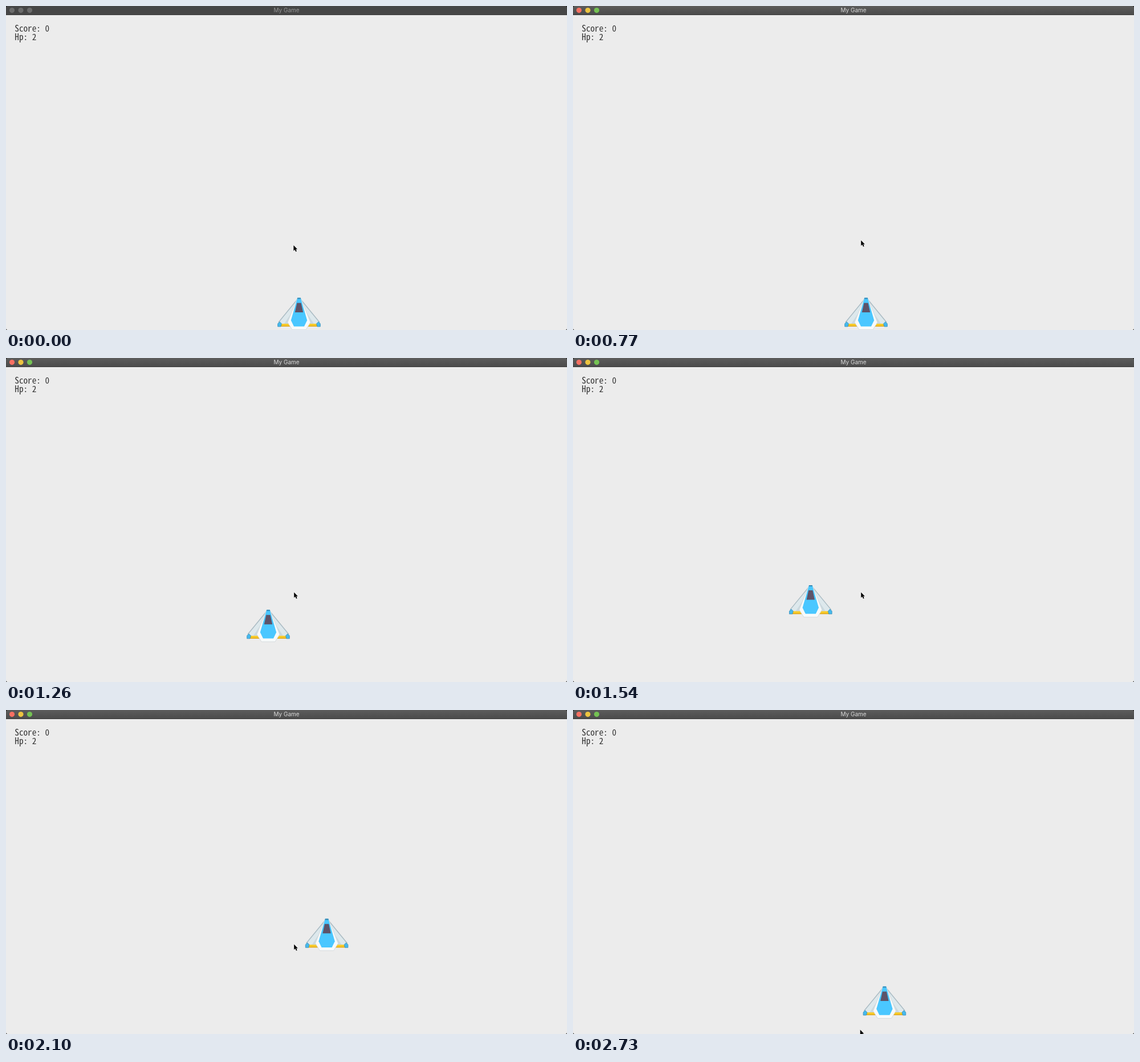
These frames come from a looping animation (984x569 px, 2800 ms). An HTML page:

```html
<!DOCTYPE html>
<html lang="en">
<head>
<meta charset="utf-8">
<title>My Game</title>
<style>
  html, body { margin: 0; width: 100%; height: 100%; overflow: hidden; background: #ececec; }
  svg { display: block; width: 984px; height: 569px; }
  .title { font: 10px Inter, Roboto, sans-serif; text-anchor: middle; }
  .hud { font: 15.2px "Noto Sans Mono CJK JP", "Noto Sans CJK JP", "Noto Sans Mono", monospace; fill: #333; white-space: pre; }
</style>
</head>
<body>
<svg viewBox="0 0 984 569">
  <defs>
    <linearGradient id="bar" x1="0" y1="0" x2="0" y2="1">
      <stop offset="0" stop-color="#5c5c5c"/>
      <stop offset="1" stop-color="#4b4b4b"/>
    </linearGradient>
    <g id="wing">
      <path d="M-2.5 3L-37 44.5V49H-14L-3 20Z" fill="#dde8ec"/>
      <path d="M-5 14L-26 46H-17Z" fill="#cbd9df"/>
      <path d="M-2.8 3L-36 43.5" fill="none" stroke="#a9bac2" stroke-width="1.4"/>
      <path d="M-33 46H-15V51H-33Z" fill="#f8ca28"/>
      <path d="M-33 49.6H-15V51H-33Z" fill="#dca51e"/>
      <path d="M-34 42.5L-37.3 46V51H-32L-30.6 46Z" fill="#45b9ee" stroke="#3b8fb5" stroke-width=".8"/>
    </g>
  </defs>

  <rect width="984" height="569" fill="#ececec"/>
  <rect id="top" width="984" height="15.5"/>
  <rect y="15" width="984" height="1" fill="#3a3a3a"/>
  <path d="M0 0H3Q0 0 0 3ZM984 0H981Q984 0 984 3ZM0 569V566Q0 569 3 569ZM984 569V566Q984 569 981 569Z" fill="#111"/>
  <g id="lights">
    <circle cx="10.5" cy="7.6" r="4.6"/>
    <circle cx="26" cy="7.6" r="4.6"/>
    <circle cx="41.5" cy="7.6" r="4.6"/>
  </g>
  <text id="title" class="title" x="492" y="11.4">My Game</text>
  <text class="hud" x="15.3" y="45">Score: 0</text>
  <text class="hud" x="15.3" y="60.3">Hp: 2</text>

  <g id="ship">
    <use href="#wing"/>
    <use href="#wing" transform="scale(-1 1)"/>
    <path d="M-3 1L-20 43.5L-12 56.5H12L20 43.5L3 1Z" fill="#f8fafa" stroke="#d3d9dc" stroke-width=".9"/>
    <path d="M-2.8 .5L-14.2 40L-9 50.7H9L14.2 40L2.8 .5Z" fill="#4ac7ff"/>
    <path d="M-2.7 .4H2.7L3.2 2.5H-3.2Z" fill="#3789b3"/>
    <path d="M-3.6 9.5H3.6L7.2 26H-7.2Z" fill="#5d5369"/>
  </g>

  <path id="cursor" d="M0 0V9.6L2.2 7.6L3.8 11.2L5.5 10.5L4 7H6.8Z" fill="#000" stroke="#fff" stroke-width=".9" paint-order="stroke"/>
</svg>
<script>
  const LOOP = 2800, TICK = 70, STEP = 5.4;
  const $ = id => document.getElementById(id);
  const lamps = [...$('lights').children];
  const lit = ['#f86f62', '#edc440', '#74c253'];

  // Held keys: start ms, end ms, steps moved
  const across = [[980, 1050, -5], [1180, 1400, -13], [1680, 2170, 31], [2340, 2450, -7]];
  const along = [[1050, 1400, -21], [1540, 1640, -6], [2100, 2450, 22]];

  const part = (t, a, b) => Math.min(1, Math.max(0, (t - a) / (b - a)));
  const smooth = p => p * p * (3 - 2 * p);
  const travel = (keys, t) =>
    STEP * keys.reduce((sum, [a, b, n]) => sum + Math.round(n * part(t, a, b)), 0);
  const place = (el, x, y) => el.setAttribute('transform', `translate(${x} ${y})`);

  function draw(ms) {
    const t = Math.floor((ms % LOOP) / TICK) * TICK;
    const active = t >= 560;
    $('top').setAttribute('fill', active ? 'url(#bar)' : '#464646');
    $('title').setAttribute('fill', active ? '#dadada' : '#979797');
    lamps.forEach((c, i) => c.setAttribute('fill', active ? lit[i] : '#6c6c6c'));

    place($('ship'), 514 + travel(across, t), 512 + travel(along, t));

    const rise = smooth(part(t, 0, 350));
    const drop = smooth(part(t, 2450, 2730));
    place($('cursor'), 504.4 + 0.8 * rise - 1.5 * drop, 420.3 - 8.8 * rise + 150 * drop);
  }

  const start = performance.now();
  function loop(now) {
    draw(Math.max(0, now - start));
    requestAnimationFrame(loop);
  }
  draw(0);
  requestAnimationFrame(loop);
</script>
</body>
</html>
```
